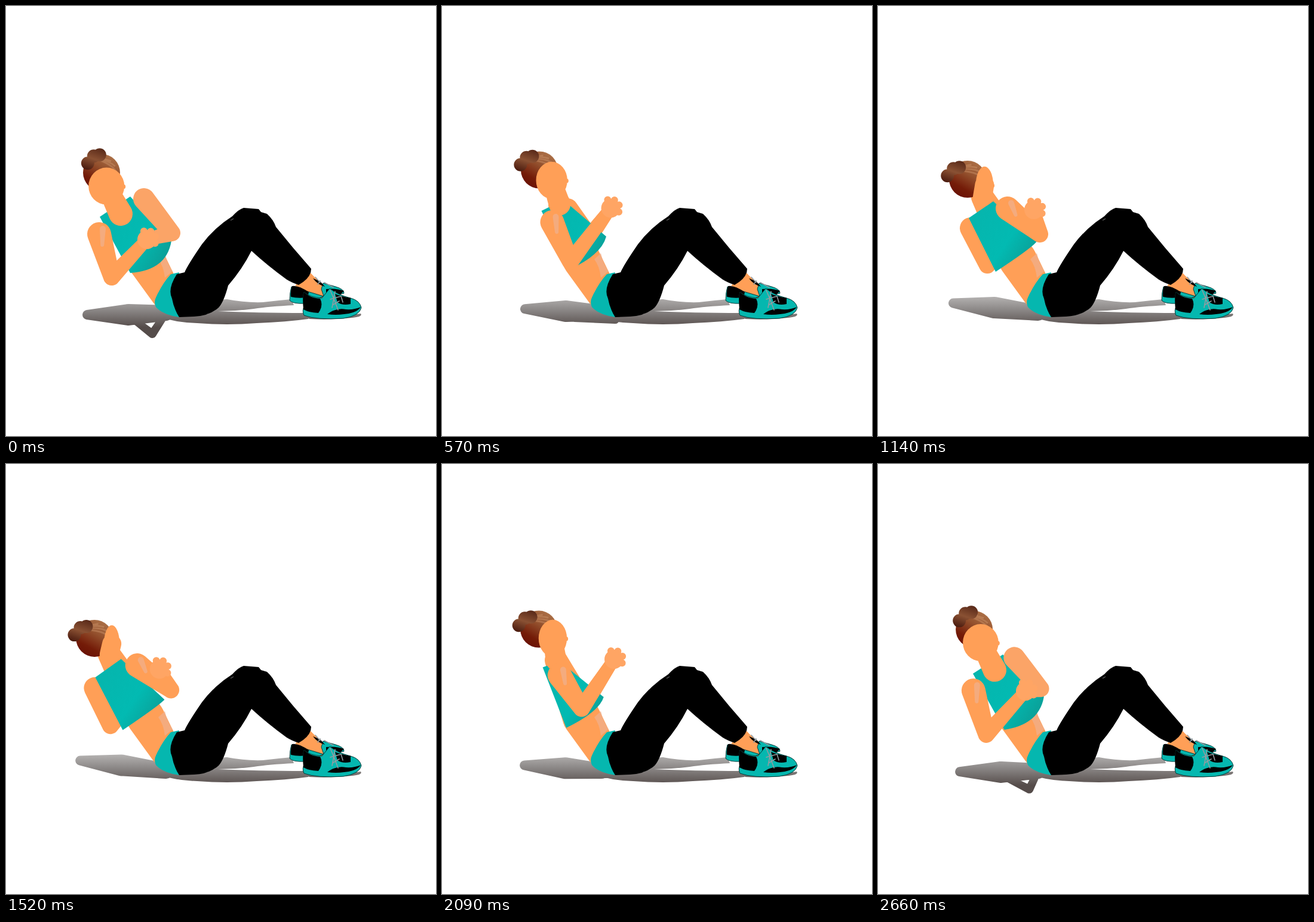
Write an HTML page that moves like this. It is 720x720 px and loops after 3.04 s.

```html
<!DOCTYPE html>
<html lang="en">
<head>
<meta charset="utf-8">
<title>Seated twist</title>
<style>
html, body { margin: 0; width: 100%; height: 100%; overflow: hidden; background: #fff; }
svg { display: block; width: 100vw; height: 100vh; }
.teal { fill: #05b7af; }
.skin { fill: #ff9f57; }
.far { fill: #fba467; }
.light { fill: #f0b18e; opacity: .7; }
.lace { fill: none; stroke: #929ca1; stroke-width: 1.6; stroke-linecap: round; }
.sole { fill: #05b7af; stroke: #063d3b; stroke-width: 1; }
#top { fill: url(#cloth); }
#hair { fill: url(#hairTone); }
#bun { fill: url(#bunTone); }
#strands { fill: none; stroke: #d9a37a; stroke-opacity: .35; stroke-width: 3; }
#hands { fill: #ffa564; }
</style>
</head>
<body>
<svg viewBox="0 0 720 720">
  <defs>
    <linearGradient id="shade" gradientUnits="userSpaceOnUse" x1="0" y1="484" x2="0" y2="538">
      <stop offset="0" stop-color="#b9b7b6"/><stop offset=".5" stop-color="#878382"/><stop offset="1" stop-color="#554c4a"/>
    </linearGradient>
    <linearGradient id="cloth" x1="0" y1="0" x2="1" y2=".7">
      <stop offset="0" stop-color="#07b4ac"/><stop offset=".65" stop-color="#02bab2"/><stop offset="1" stop-color="#0b9f97"/>
    </linearGradient>
    <linearGradient id="hairTone" x1=".8" y1="0" x2=".25" y2="1">
      <stop offset="0" stop-color="#b0764c"/><stop offset=".4" stop-color="#93502d"/><stop offset=".75" stop-color="#741c08"/><stop offset="1" stop-color="#681004"/>
    </linearGradient>
    <linearGradient id="bunTone" x1=".7" y1="0" x2=".3" y2="1">
      <stop offset="0" stop-color="#5b2b1a"/><stop offset=".5" stop-color="#8a5133"/><stop offset="1" stop-color="#4d1d10"/>
    </linearGradient>
  </defs>

  <g fill="url(#shade)">
    <path id="shadow"/>
    <path d="M338 516Q350 491 370 491Q400 497 430 496Q455 493 478 491L482 501Q440 503 415 507Q385 511 355 511Q420 514 500 514Q512 520 506 524Q470 529 420 531Q370 535 320 531Q280 530 250 518Z"/>
    <path d="M500 519Q555 521 594 515Q598 520 580 522Q545 526 508 524Z"/>
  </g>

  <path id="farBack" class="skin"/>
  <path id="torso" class="skin"/>
  <path class="light" d="M255 424L266 414Q270 432 279 444L266 455Q264 436 255 424Z"/>
  <path id="top"/>
  <path id="hair"/>
  <path id="strands"/>
  <path id="face" class="skin"/>
  <path id="bun"/>
  <path id="farFront" class="far"/>
  <path id="nearArm" class="skin"/>
  <path id="shine" class="light"/>
  <path id="hands"/>

  <path class="teal" d="M290 446L276 449Q262 464 251 488Q247 496 251 504Q262 517 290 521L296 510L286 470Z"/>
  <path class="skin" d="M484 468L510 447Q519 457 534 469L531 489Q512 492 502 478Z"/>

  <g id="rear-shoe">
    <path class="sole" d="M478 470L505 478L535 487L566 481Q566 474 552 470L531 464L528 474L532 486L500 498Q480 499 475 493Q475 480 478 470Z"/>
    <path d="M479 469Q489 467 507 479L505 488Q488 490 477 487Q476 477 479 469ZM536 474Q552 472 566 477L560 483L536 484ZM514 456L526 461L534 470Q521 466 514 456Z"/>
    <path class="lace" d="M518 454L526 463M526 460L522 466M533 463L548 471"/>
  </g>
  <g id="front-shoe">
    <path class="sole" d="M499 479Q509 488 529 489L542 473Q556 484 577 489Q592 493 595 505Q592 519 565 523Q520 526 499 518Q495 510 500 502Q496 488 499 479Z"/>
    <path d="M499 479Q509 489 526 490Q532 502 523 514Q506 513 498 508Q496 488 499 479ZM551 482Q560 486 577 489L577 499Q563 502 555 496ZM538 516Q552 505 569 508Q583 509 594 504Q588 514 566 516Q552 518 538 516Z"/>
    <path class="lace" d="M543 476L550 493L556 509M551 478L546 505M543 491L561 486L564 496M548 500L558 494"/>
  </g>

  <path d="M286 449L299 446Q304 434 328 399Q349 371 379 352Q390 340 398 338L423 340L427 345L437 348Q448 358 452 370Q481 406 511 440Q511 455 490 467Q478 463 470 458Q437 434 411 410Q396 440 372 468Q365 495 356 505Q340 519 315 520L290 521Q281 507 278 490Q270 474 286 449Z"/>
  <path d="M376 359L381 356" stroke="#777" fill="none"/>
</svg>

<script>
// Joint positions for a turn of 0 (facing front), 1 (half front), 2 (side), 3 (back)
const JOINTS = {
  head:        [[160, 279], [164, 272], [162, 277], [150, 290]],
  neck:        [[192, 348], [204, 337], [190, 328], [175, 320]],
  strapLeft:   [[157, 353], [164, 346], [169, 340], [152, 355]],
  strapRight:  [[208, 319], [212, 319], [195, 331], [193, 327]],
  bust:        [[277, 393], [280, 381], [270, 391], [266, 394]],
  hem:         [[208, 447], [221, 440], [207, 442], [197, 445]],
  shoulder:    [[156, 382], [170, 372], [199, 352], [217, 339]],
  elbow:       [[177, 454], [193, 450], [237, 406], [271, 382]],
  hand:        [[236, 391], [276, 352], [289, 325], [261, 341]],
  farShoulder: [[231, 323], [221, 328], [199, 352], [155, 372]],
  farElbow:    [[278, 380], [258, 366], [237, 406], [183, 434]]
};
const CHEST = [234, 425], HIP = [268, 482], SEAT = [268, 514];
const STEP = 190, STEPS = 16;

const { PI, cos, sin, min, max, floor } = Math;
const mix = (a, b, t) => a.map((v, i) => v + (b[i] - v) * t);
const add = ([x, y], dx, dy) => [x + dx, y + dy];
const polar = ([x, y], r, deg) => [x + r * cos(deg * PI / 180), y + r * sin(deg * PI / 180)];

function oval([x, y], rx, ry = rx) {
  return `M${x - rx} ${y}a${rx} ${ry} 0 1 1 ${2 * rx} 0a${rx} ${ry} 0 1 1 ${-2 * rx} 0Z`;
}

// Tapered, round-ended shape between two circles
function limb(a, ra, b, rb) {
  const dx = b[0] - a[0], dy = b[1] - a[1];
  const dir = Math.atan2(dy, dx) * 180 / PI;
  const open = Math.acos((ra - rb) / Math.hypot(dx, dy)) * 180 / PI;
  return `M${polar(a, ra, dir + open)}A${ra} ${ra} 0 ${+(open < 90)} 1 ${polar(a, ra, dir - open)}`
    + `L${polar(b, rb, dir - open)}A${rb} ${rb} 0 ${+(open > 90)} 1 ${polar(b, rb, dir + open)}Z`;
}

const arm = (shoulder, elbow, hand, r) =>
  limb(shoulder, r, elbow, 14) + limb(elbow, 14, hand, 10);

function draw(id, d) {
  document.getElementById(id).setAttribute("d", d);
}

function setPose(turn) {
  const from = min(floor(turn), 2);
  const at = {};
  for (const name in JOINTS) {
    at[name] = mix(JOINTS[name][from], JOINTS[name][from + 1], turn - from);
  }
  const { head, neck, strapLeft, strapRight, bust, hem, shoulder, elbow, hand } = at;

  // The face slides round the skull and narrows as she turns away
  const face = polar(head, 24 + 2 * turn, 70 - 23 * turn + 2 * turn ** 2);
  const faceWidth = 30 - 1.7 * turn ** 2;
  draw("face", oval(face, faceWidth, 31) + oval(add(face, faceWidth - 2, 1), 4)
    + limb(face, 16, neck, 20 - 1.3 * turn));

  const bun = polar(head, 28, -118 - 15 * min(turn, 2));
  draw("hair", oval(head, 31));
  draw("bun", [-1, 0, 1].map(k => oval(add(bun, 10 * k, k * k * 5 - 7 * k - 3), 11)).join(""));
  draw("strands", [-75, -50, -25, 0].map(deg =>
    `M${bun}Q${polar(head, 24, deg - 35)} ${polar(head, 25, deg)}`).join(""));

  const bottom = add(bust, -8, 50 - 13 * turn);
  draw("torso", limb(neck, 19, CHEST, 32) + limb(CHEST, 32, HIP, 26));
  draw("top", `M${strapLeft}L${strapRight}L${bust}Q${bottom} ${hem}Z`);

  const farArm = arm(at.farShoulder, at.farElbow, hand, 18);
  draw("farFront", turn < 1.5 ? farArm : "");
  draw("farBack", turn < 1.5 ? "" : farArm);
  draw("nearArm", arm(shoulder, elbow, hand, 20));
  draw("shine", limb(add(shoulder, 6, -9), 5, mix(shoulder, elbow, .25), 3));
  draw("hands", oval(hand, 16)
    + [0, 1, 2, 3].map(k => oval(polar(hand, 15, 45 * k - 110), 6)).join(""));

  const back = [head[0] + 45, 517 - 4 * turn];
  const crown = [head[0] - 24, 517 - 6.5 * turn];
  const bend = [245 + 30 * turn, 549 - 16 * turn];
  draw("shadow", limb(crown, 8, back, 18) + limb(back, 18, SEAT, 13)
    + limb(add(back, 14, 12), 6, bend, 7) + limb(bend, 7, SEAT, 6));
}

// A quick turn away, a short hold, a slower return and a rest
const turnAt = k => min(k * k / 4, k / 2, 3.15, max(.25, (14.5 - k) * .55));

let shown = -1;
function frame(now) {
  const step = floor(now / STEP) % STEPS;
  if (step !== shown) setPose(turnAt(shown = step));
  requestAnimationFrame(frame);
}
setPose(turnAt(0));
requestAnimationFrame(frame);
</script>
</body>
</html>
```
